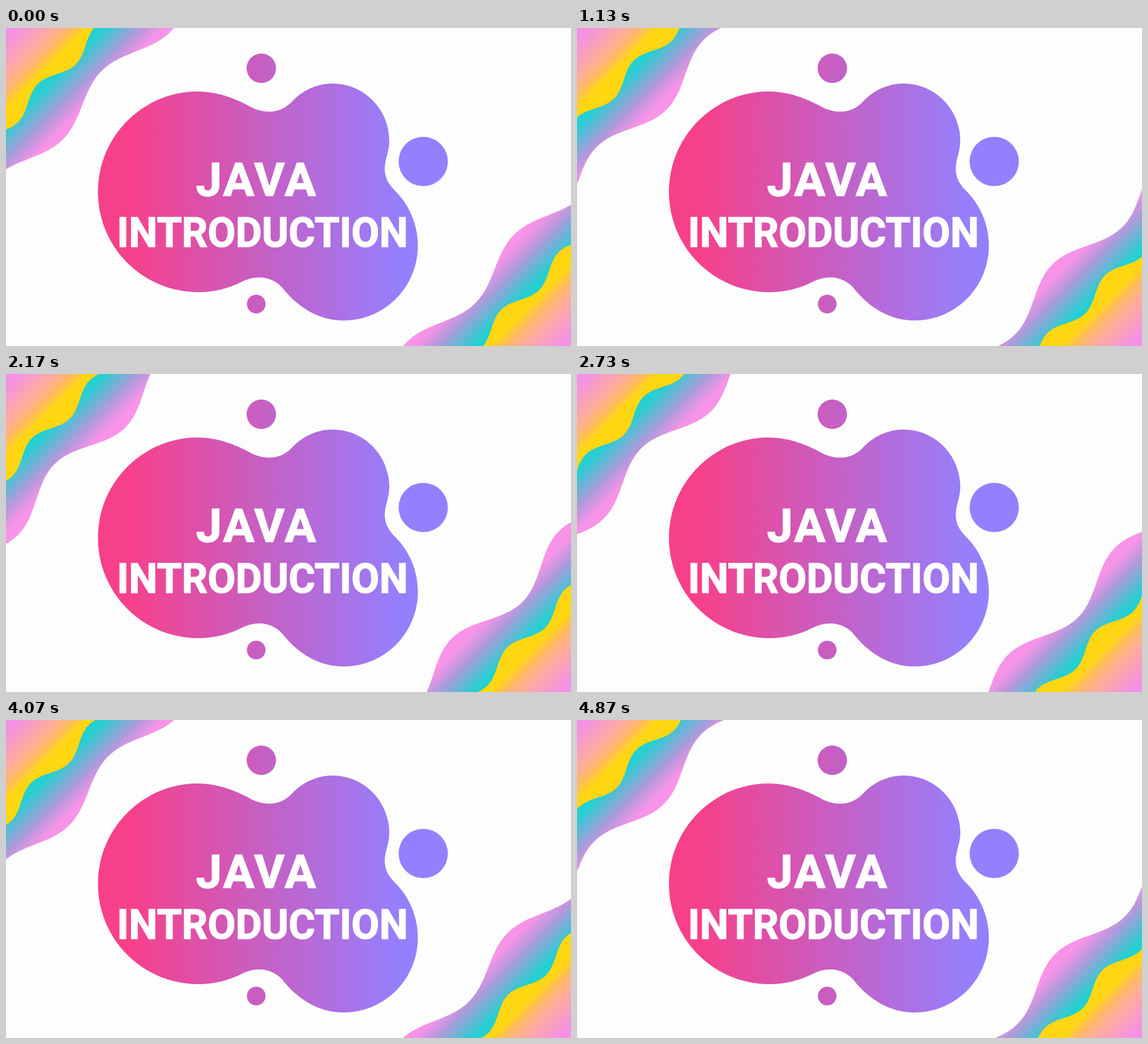
These frames come from a looping animation (998 px wide and 561 px high, 4.96 s). An HTML page:

```html
<!DOCTYPE html>
<html lang="en">
<head>
<meta charset="utf-8">
<title>Java introduction</title>
<style>
  html, body { margin: 0; width: 100%; height: 100%; overflow: hidden; background: #fdfdfd; }
  svg { display: block; width: 998px; height: 561px; }
  text {
    font-family: Roboto, Lato, sans-serif;
    font-weight: 700;
    text-anchor: middle;
    fill: #fff;
    stroke: #fff;
    stroke-width: 1.5px;
  }
</style>
</head>
<body>
<svg viewBox="0 0 998 561">
  <defs>
    <linearGradient id="blob" gradientUnits="userSpaceOnUse" x1="215" x2="700" y1="0" y2="0">
      <stop offset="0" stop-color="#f7408a"/>
      <stop offset="1" stop-color="#9480ff"/>
    </linearGradient>
    <linearGradient id="cool" gradientUnits="userSpaceOnUse" x1="0" y1="0" x2="155.6" y2="155.6">
      <stop offset=".56" stop-color="#25cfd2"/>
      <stop offset=".77" stop-color="#b598dc"/>
      <stop offset=".89" stop-color="#f794e8"/>
      <stop offset="1" stop-color="#f794e8"/>
    </linearGradient>
    <linearGradient id="warm" gradientUnits="userSpaceOnUse" x1="0" y1="0" x2="155.6" y2="155.6">
      <stop offset="0" stop-color="#f58ff0"/>
      <stop offset=".1" stop-color="#f694da"/>
      <stop offset=".28" stop-color="#ffac9c"/>
      <stop offset=".37" stop-color="#ffb869"/>
      <stop offset=".46" stop-color="#ffd612"/>
    </linearGradient>
    <g id="corner">
      <path id="outer" fill="url(#cool)"/>
      <path id="inner" fill="url(#warm)"/>
    </g>
  </defs>

  <use href="#corner"/>
  <use href="#corner" transform="rotate(180 499 280.5)"/>

  <g fill="url(#blob)">
    <path d="M162.4 289C162.4 191 242 112 338 112C376 112 408 126 432 139C454 151 483 152 503 132
      C523 110 549 98 577 98C632 98 677 143 677 199C677 218 669 232 669 248C669 266 677 277 688 288
      C712 312 727.5 346 727.5 384C727.5 457 669 516 596 516C553 516 517 493 492 463
      C474 438 443 434 416 448C394 459 368 466 340 466C242 466 162.4 387 162.4 289Z"/>
    <circle cx="451" cy="71" r="26"/>
    <circle cx="737" cy="235.5" r="43.5"/>
    <circle cx="442" cy="487" r="16.5"/>
  </g>

  <text x="443" y="296" font-size="82" letter-spacing="3">JAVA</text>
  <text x="453" y="386" font-size="71.5">INTRODUCTION</text>
</svg>
<script>
  const LOOP = 4960, STEP = 80, CYCLE = 3850, TAU = Math.PI * 2;
  const outer = document.getElementById('outer');
  const inner = document.getElementById('inner');

  // Corner area bounded by a wave; u runs along the diagonal edge, v is its depth.
  function wavePath(depth) {
    let d = 'M-400 -400';
    for (let u = -330; u <= 330; u += 5) {
      const v = depth(u);
      d += `L${((v + u) * Math.SQRT1_2).toFixed(2)} ${((v - u) * Math.SQRT1_2).toFixed(2)}`;
    }
    return d + 'Z';
  }

  function draw(t) {
    const turn = t / CYCLE;
    const pulse = Math.cos(TAU * turn);
    // The outer wave travels up the edge, the inner one down it.
    outer.setAttribute('d', wavePath(u =>
      193 - 1.5 * pulse + (20 - 1.5 * pulse) * Math.cos(TAU * ((u + 68) / 268 - turn))));
    inner.setAttribute('d', wavePath(u =>
      122.5 - 1.5 * pulse - 11.5 * Math.cos(TAU * ((u + 30) / 144 + 2 * turn))));
  }

  const start = performance.now();
  let shown = -1;
  function tick() {
    const t = (performance.now() - start) % LOOP;
    const step = Math.min(Math.floor((t + 10) / STEP), LOOP / STEP - 1);
    if (step !== shown) draw((shown = step) * STEP);
    requestAnimationFrame(tick);
  }
  tick();
</script>
</body>
</html>
```
